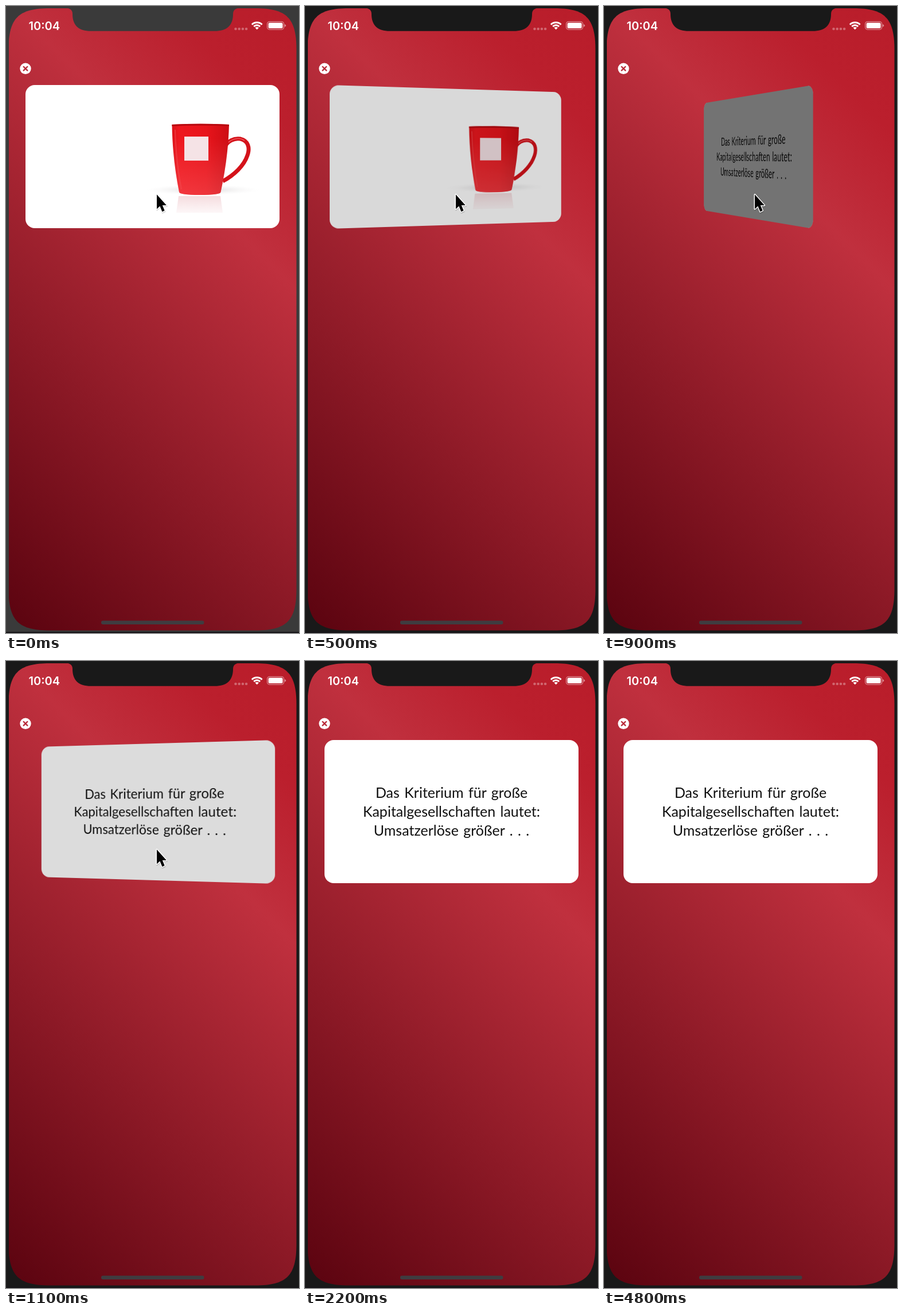
An HTML page for the animation above (5000 ms loop, 511x1095 px).

```html
<!DOCTYPE html>
<html lang="de">
<head>
<meta charset="utf-8">
<title>Flip card</title>
<style>
  html, body { margin: 0; width: 100%; height: 100%; overflow: hidden; }
  body { position: relative; background: currentColor; animation: bezel 5s linear infinite; }
  @keyframes bezel {
    0%, 2% { color: #3a3a3a; }
    6%, 100% { color: #191919; }
  }
  .screen {
    position: absolute; left: 4.5px; top: 4px; width: 502px; height: 1086.5px;
    background: linear-gradient(225deg, #b91d2a 0%, #bb1f2d 14%, #c0303e 31%, #5a030f 100%);
    clip-path: path("M0 72C0 17 17 0 72 0H430C485 0 502 17 502 72V1014.5C502 1069.5 485 1086.5 430 1086.5H72C17 1086.5 0 1069.5 0 1014.5Z");
  }
  .layer { position: absolute; left: 0; top: 0; width: 511px; height: 1095px; }
  .clock { font: 600 20px Inter, sans-serif; }
  .card {
    position: absolute; left: 34px; top: 137.8px; width: 443px; height: 250.6px;
    border-radius: 16px; overflow: hidden; background: #fff;
  }
  .face { position: absolute; inset: 0; width: 100%; height: 100%; }
  #back { visibility: hidden; }
  #back text {
    font: 25px Lato, sans-serif; word-spacing: 2px;
    text-anchor: middle; fill: #111;
  }
  #shade { position: absolute; inset: 0; background: #000; opacity: 0; }
</style>
</head>
<body>
<div class="screen"></div>

<svg class="layer" viewBox="0 0 511 1095">
  <!-- notch -->
  <path fill="currentColor" d="M104 3.5C112 4 116 7 116 14C116 34 127 43.8 148 43.8H364C385 43.8 396 34 396 14C396 7 400 4 408 3.5V0H104Z"/>
  <rect y="1093" width="511" height="2" fill="#151417"/>

  <text class="clock" x="39.5" y="42" fill="#fff">10:04</text>
  <g fill="#fff" fill-opacity=".32">
    <circle cx="400.5" cy="40" r="2.3"/><circle cx="406.7" cy="40" r="2.3"/>
    <circle cx="412.9" cy="40" r="2.3"/><circle cx="419.1" cy="40" r="2.3"/>
  </g>
  <g transform="translate(437.7 41.3)" fill="none" stroke="#fff" stroke-width="3">
    <path d="M-8.84-8.84A12.5 12.5 0 0 1 8.84-8.84M-5.44-5.44A7.7 7.7 0 0 1 5.44-5.44"/>
    <path d="M0 0L-3.2-3.2A4.5 4.5 0 0 1 3.2-3.2Z" fill="#fff" stroke="none"/>
  </g>
  <rect x="455.6" y="27.3" width="29" height="13.8" rx="4" fill="none" stroke="#fff" stroke-opacity=".5" stroke-width="1.2"/>
  <rect x="457.6" y="29.3" width="25" height="9.8" rx="2.2" fill="#fff"/>
  <path d="M486 31.8Q488.2 32.8 488.2 34.2T486 36.6Z" fill="#fff" fill-opacity=".5"/>

  <!-- close button -->
  <circle cx="34" cy="109.3" r="9.7" fill="#fff"/>
  <path d="M30.7 106L37.3 112.6M37.3 106L30.7 112.6" stroke="#b82a38" stroke-width="2.4" stroke-linecap="round"/>

  <rect x="166" y="1073.5" width="179.5" height="6.5" rx="3.2" fill="#3f3c40"/>
</svg>

<div class="card" id="card">
  <svg class="face" id="front" viewBox="34 138 443 250.5">
    <defs>
      <linearGradient id="glaze">
        <stop offset="0" stop-color="#dc1219"/><stop offset=".12" stop-color="#ee171e"/>
        <stop offset=".6" stop-color="#e8141b"/><stop offset="1" stop-color="#cc0d14"/>
      </linearGradient>
      <linearGradient id="glow" x2="0" y2="1">
        <stop offset=".2" stop-color="#ff8a90" stop-opacity="0"/><stop offset="1" stop-color="#ff8a90" stop-opacity=".28"/>
      </linearGradient>
      <linearGradient id="mirror" x2="0" y2="1">
        <stop offset="0" stop-color="#eec4c8" stop-opacity=".6"/><stop offset="1" stop-color="#fbeef0" stop-opacity=".5"/>
      </linearGradient>
      <radialGradient id="floor">
        <stop offset="0" stop-color="#c8c4c6" stop-opacity=".7"/><stop offset="1" stop-color="#eee" stop-opacity="0"/>
      </radialGradient>
    </defs>
    <ellipse cx="343" cy="321" rx="99" ry="9" fill="url(#floor)"/>
    <path d="M301 332H374L378 361H297Z" fill="url(#mirror)"/>
    <path d="M381 247C386 236 398 230 409 232C422 235 426 247 421 261C415 279 398 295 378 306" fill="none" stroke="#d4121a" stroke-width="7"/>
    <path d="M388 238C396 231 408 229 416 235" fill="none" stroke="#f0575c" stroke-width="1.6"/>
    <path id="cup" d="M289.5 207Q339 204.5 389 207C388 250 382 290 374.5 325Q374 330 338 330Q303 330 302 325C295 290 290 250 289.5 207Z" fill="url(#glaze)"/>
    <use href="#glow-cup"/>
    <path d="M289.5 207Q339 204.5 389 207C388 250 382 290 374.5 325Q374 330 338 330Q303 330 302 325C295 290 290 250 289.5 207Z" fill="url(#glow)"/>
    <path d="M289.5 207Q339 204.5 389 207V210Q339 207.5 289.5 210Z" fill="#b80a10"/>
    <path d="M295 216C296 254 300 290 306 320" fill="none" stroke="#f4494d" stroke-width="2" opacity=".6"/>
    <rect x="311" y="228" width="42" height="42" fill="#f5e3e6"/>
  </svg>
  <svg class="face" id="back" viewBox="34 138 443 250.5">
    <text x="255.5" y="239">Das Kriterium für große</text>
    <text x="255.5" y="272">Kapitalgesellschaften lautet:</text>
    <text x="255.5" y="304.5">Umsatzerlöse größer . . .</text>
  </svg>
  <div id="shade"></div>
</div>

<svg class="layer" id="pointer" viewBox="0 0 511 1095">
  <defs>
    <path id="arrow" d="M0 0V25.2L5.4 20.2L9.4 30L13.6 28L9.8 18.8H16.8Z" stroke-linejoin="round"/>
  </defs>
  <use href="#arrow" x="263.5" y="330.8" stroke="#000" stroke-width="3" opacity=".15"/>
  <use href="#arrow" x="263" y="329.3" stroke="#fff" stroke-width="2.8" paint-order="stroke"/>
</svg>

<script>
  const LOOP = 5000, STEP = 100, FLIP_START = 310, FLIP_TIME = 973, POINTER_END = 1600;
  const HALF = 221.5, DEPTH = 1130;
  const [card, front, back, shade, pointer] =
    ['card', 'front', 'back', 'shade', 'pointer'].map(id => document.getElementById(id));
  const show = (el, on) => { el.style.visibility = on ? 'visible' : 'hidden'; };
  const origin = performance.now();

  function draw() {
    // The flip moves at ten poses per second.
    const time = (performance.now() - origin + 10) % LOOP;
    const pose = Math.floor(time / STEP) * STEP;
    const x = Math.min(1, Math.max(0, (pose - FLIP_START) / FLIP_TIME));
    const turn = 90 * (1 - Math.cos(Math.PI * x));
    const flipped = turn > 90;
    const angle = flipped ? turn - 180 : turn;
    const push = HALF * Math.sin(Math.abs(angle) * Math.PI / 180);

    card.style.transform = angle
      ? `perspective(${DEPTH}px) translateZ(${-push}px) rotateY(${angle}deg)` : 'none';
    shade.style.opacity = Math.abs(angle) * 0.0091;
    show(front, !flipped);
    show(back, flipped);
    show(pointer, pose < POINTER_END);
    requestAnimationFrame(draw);
  }
  draw();
</script>
</body>
</html>
```
